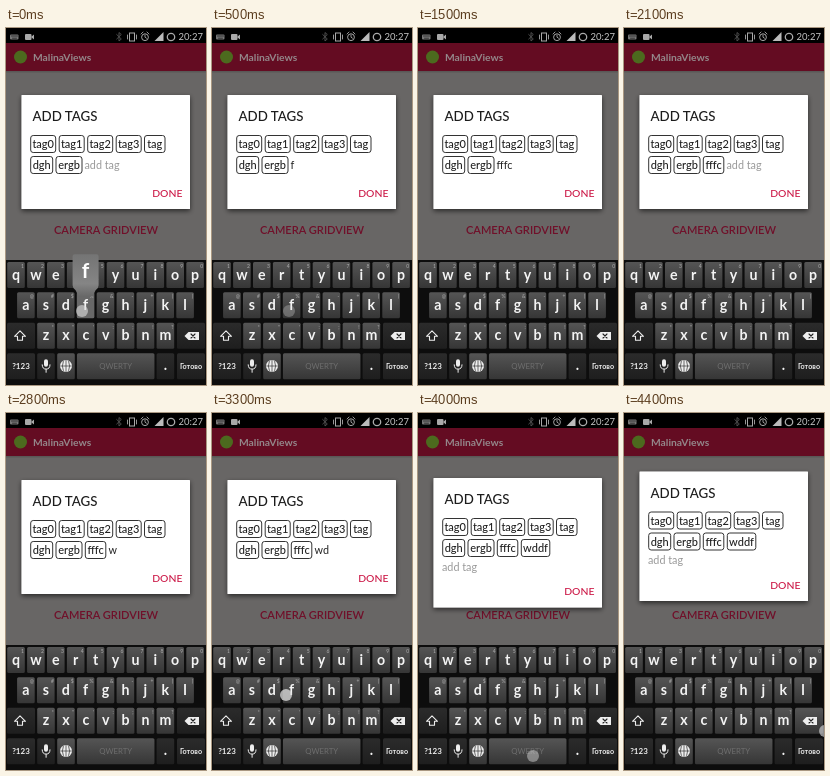
An HTML page for the animation above (4500 ms loop, 200 px wide and 357 px high).

```html
<!DOCTYPE html>
<html lang="en">
<head>
<meta charset="utf-8">
<title>Tag input</title>
<style>
html, body { margin: 0; width: 100%; height: 100%; overflow: hidden; background: #000; }
svg { display: block; width: 100%; height: 100%; font-family: Lato, "Open Sans", sans-serif; }
</style>
</head>
<body>
<svg id="stage" viewBox="0 0 200 357" preserveAspectRatio="none">
  <defs>
    <linearGradient id="key" x2="0" y2="1"><stop stop-color="#555"/><stop offset="1" stop-color="#363636"/></linearGradient>
    <linearGradient id="fn" x2="0" y2="1"><stop stop-color="#2b2b2b"/><stop offset="1" stop-color="#1e1e1e"/></linearGradient>
    <linearGradient id="pop" x2="0" y2="1"><stop stop-color="#747474"/><stop offset=".7" stop-color="#858585"/><stop offset="1" stop-color="#686868"/></linearGradient>
    <filter id="shade" x="-10%" y="-10%" width="120%" height="125%"><feDropShadow dx="0" dy="2" stdDeviation="2.6" flood-color="#000" flood-opacity=".6"/></filter>
  </defs>
</svg>
<script>
const NS = 'http://www.w3.org/2000/svg';
const stage = document.getElementById('stage');

function add(parent, name, attrs = {}, text) {
  const el = document.createElementNS(NS, name);
  for (const k in attrs) el.setAttribute(k, attrs[k]);
  if (text !== undefined) el.textContent = text;
  parent.appendChild(el);
  return el;
}
const rect = (p, x, y, width, height, fill, rx = 0) => add(p, 'rect', { x, y, width, height, fill, rx });
const label = (p, s, x, y, size, fill, extra = {}) =>
  add(p, 'text', { x, y, 'font-size': size, fill, ...extra }, s);
const line = (p, d, stroke, w = 1) =>
  add(p, 'path', { d, stroke, fill: 'none', 'stroke-width': w, 'stroke-linecap': 'round', 'stroke-linejoin': 'round' });
const show = (el, on) => el.setAttribute('visibility', on ? 'visible' : 'hidden');
const mid = { 'text-anchor': 'middle' };
const medium = { 'font-weight': 500 };
const midBold = { ...mid, 'font-weight': 700 };

// Activity behind the dialog
rect(stage, 0, 0, 200, 357, '#686665');
rect(stage, 0, 15, 200, 28, '#640c22');
rect(stage, 0, 43, 200, 1.5, '#5a5857');
add(stage, 'circle', { cx: 14.5, cy: 29, r: 6.5, fill: '#4c6a1e' });
label(stage, 'MalinaViews', 27, 32.6, 10.3, '#94878a', { 'font-weight': 700 });
label(stage, 'CAMERA GRIDVIEW', 100, 206, 11.1, '#70102a', { ...mid, 'font-weight': 600 });

// Status bar
rect(stage, 0, 0, 200, 15, '#000');
const dim = '#a8a8a8';
rect(stage, 4, 6.5, 8.5, 5, '#777', 1);
line(stage, 'M5.5 8h6M6.5 10.2h4', '#222', .8);
rect(stage, 19, 6, 6.5, 6, dim, 1);
add(stage, 'path', { d: 'M25 9l3-2.5v5z', fill: dim });
line(stage, 'M110.7 6.5l4.6 4.5-2.3 2V4.5l2.3 2-4.6 4.5', '#555', .9);
add(stage, 'rect', { x: 123.5, y: 5, width: 5, height: 8, stroke: dim, fill: 'none' });
line(stage, 'M121.5 7v4M130.5 7v4', dim, .9);
add(stage, 'circle', { cx: 139, cy: 9.2, r: 3.4, stroke: dim, fill: 'none' });
line(stage, 'M139 7.2v2l1.5 1M135 6l2-2M143 6l-2-2', dim, .9);
add(stage, 'path', { d: 'M148.5 13h9V4z', fill: '#bbb' });
add(stage, 'circle', { cx: 165, cy: 9, r: 3.7, stroke: '#aaa', fill: 'none', 'stroke-width': 1.3 });
label(stage, '20:27', 172.6, 12.3, 9.5, '#c4c4c4');

// Dialog
const dialog = add(stage, 'g');
const panel = rect(dialog, 15.5, 67, 168.5, 114, '#fff', .5);
panel.setAttribute('filter', 'url(#shade)');
label(dialog, 'ADD TAGS', 26.5, 93.2, 13.3, '#1c1c1c', medium);

function tag(s, x, y, w) {
  const g = add(dialog, 'g');
  add(g, 'rect', { x: x + .5, y: y + .5, width: w - 1, height: 17, rx: 2.5, fill: '#fff', stroke: '#333' });
  label(g, s, x + w / 2, y + 13, 11, '#222', { ...mid, ...medium });
  return g;
}
['tag0', 'tag1', 'tag2', 'tag3'].forEach((s, i) => tag(s, 24.2 + i * 28.5, 107, 26));
tag('tag', 138, 107, 21.5);
tag('dgh', 24.2, 128, 23);
tag('ergb', 49.5, 128, 27);
const tagA = tag('fffc', 78.8, 128, 21.5);
const tagB = tag('wddf', 102.8, 128, 29.5);
const input = label(dialog, '', 79, 141, 10.8, '#222');
const done = label(dialog, 'DONE', 146.2, 168.6, 10.4, '#cc1a48', medium);

// Keyboard
const board = add(stage, 'g');
rect(board, 0, 232, 200, 125, '#0d0d0d');
const keys = {};
const drawKey = (x, y, w, fill) => rect(board, x - w / 2, y - 13, w, 26, `url(#${fill})`, 1.5);

function row(letters, hints, x0, y) {
  [...letters].forEach((c, i) => {
    const x = x0 + i * 19.9;
    const el = drawKey(x, y, 17.6, 'key');
    label(board, hints[i], x + 8, y - 7, 5, '#b0b0b0', { 'text-anchor': 'end' });
    label(board, c, x, y + 4.5, 14.2, '#f4f4f4', midBold);
    keys[c] = { x, y, el };
  });
}
row('qwertyuiop', '1234567890', 10, 247);
row('asdfghjkl', '@#$%&-+()', 19.9, 277.3);
row('zxcvbnm', '*"\':;!?', 40, 307.8);

drawKey(15, 307.8, 28, 'fn');
line(board, 'M14 302.8l5.5 5.5h-3v4h-5v-4h-3z', '#eee', 1.1);
const back = drawKey(185, 307.8, 28, 'fn');
add(board, 'path', { d: 'M178.5 308l4-4h10.5v8h-10.5z', fill: '#eee' });
line(board, 'M185 306l4 4M189 306l-4 4', '#222', 1.1);

drawKey(15, 338.3, 28, 'fn');
label(board, '?123', 15, 340.8, 8, '#eee', midBold);
drawKey(40, 338.3, 17.6, 'fn');
rect(board, 38, 331.3, 4, 7.5, '#eee', 2);
line(board, 'M36.2 336.8q0 4.3 3.9 4.3t3.9-4.3M40.1 341.3v3', '#eee');
drawKey(60, 338.3, 17.6, 'key');
add(board, 'circle', { cx: 60, cy: 338, r: 6, fill: '#eee' });
line(board, 'M54.7 338h10.6M60 332.5v11M57.3 333.5q-2 4.5 0 9M62.7 333.5q2 4.5 0 9', '#444', .8);
drawKey(109.7, 338.3, 77.5, 'key');
label(board, 'QWERTY', 109.7, 340.8, 7.8, '#6e6e6e', mid);
drawKey(159.4, 338.3, 17.6, 'fn');
label(board, '.', 159.4, 342, 14.2, '#f4f4f4', midBold);
drawKey(185, 338.3, 28, 'fn');
label(board, 'Готово', 185, 340.8, 7.2, '#eee', midBold);

const popup = add(stage, 'g');
add(popup, 'path', {
  d: 'M-11-51h22q2 0 2 2v29q0 3-3 5l-3 6h-14l-3-6q-3-2-3-5v-29q0-2 2-2z',
  fill: 'url(#pop)'
});
const popLetter = label(popup, '', 0, -27, 21, '#fff', midBold);
const dot = add(stage, 'circle', { r: 6, fill: '#e0e0e0' });

// [start, typed text]; empty text shows the hint
const typing = [[0, ''], [100, 'f'], [700, 'ff'], [1000, 'fff'], [1300, 'fffc'], [1700, ''],
  [2700, 'w'], [3200, 'wd'], [3500, 'wdd'], [3800, 'wddf'], [3900, '']];
// [start, end, key]
const presses = [[0, 200, 'f'], [600, 800, 'f'], [1000, 1200, 'f'], [1200, 1400, 'c'],
  [2500, 2800, 'w'], [3100, 3300, 'd'], [3400, 3600, 'd'], [3700, 3900, 'f']];
// [time, x, y, opacity]
const touch = [[0, 76, 283, .6], [200, 76, 283, 0], [400, 77, 283, .15], [600, 77, 283, .45],
  [800, 77, 284, .15], [1000, 78, 288, .4], [1100, 80, 298, .4], [1200, 82, 310, .5],
  [1400, 82, 312, 0], [1500, 112, 343, 0], [1600, 112, 343, .45], [1800, 112, 343, 0],
  [2400, 31, 249, 0], [2500, 31, 249, .5], [2800, 31, 249, 0], [3000, 62, 282, 0],
  [3100, 62, 282, .5], [3300, 74, 282, .75], [3400, 66, 282, .5], [3600, 74, 283, .2],
  [3700, 77, 283, .5], [3800, 90, 305, .3], [3900, 114, 341, .5], [4000, 115, 343, .45],
  [4200, 115, 343, 0], [4300, 204, 318, 0], [4400, 201, 318, .6], [4500, 200, 318, .6]];
const lift = [[0, 0], [3900, 0], [4000, -2], [4100, -5], [4200, -7.5], [4300, -8.5], [4500, -8.5]];

function sample(table, t) {
  const i = table.findIndex(r => r[0] > t);
  const a = table[i - 1], b = table[i], p = (t - a[0]) / (b[0] - a[0]);
  return a.slice(1).map((v, j) => v + (b[j + 1] - v) * p);
}

function draw(now) {
  const t = Math.floor((now % 4500) / 100) * 100;

  const typed = typing.filter(r => r[0] <= t).pop()[1];
  const first = t >= 1700, second = t >= 3900;
  show(tagA, first);
  show(tagB, second);
  input.textContent = typed || 'add tag';
  input.setAttribute('fill', typed ? '#222' : '#999');
  input.setAttribute('x', second ? 24 : first ? 102.5 : 78.5);
  input.setAttribute('y', second ? 159.5 : 141);
  panel.setAttribute('height', second ? 129.5 : 114);
  done.setAttribute('y', second ? 184 : 168.6);
  dialog.setAttribute('transform', `translate(0 ${sample(lift, t)[0]})`);

  const press = presses.find(r => t >= r[0] && t < r[1]);
  for (const c in keys) keys[c].el.setAttribute('fill', press && press[2] === c ? '#686868' : 'url(#key)');
  show(popup, press);
  if (press) {
    const k = keys[press[2]];
    popup.setAttribute('transform', `translate(${k.x} ${k.y})`);
    popLetter.textContent = press[2];
  }
  back.setAttribute('fill', t >= 4400 ? 'url(#key)' : 'url(#fn)');

  const [x, y, o] = sample(touch, t);
  dot.setAttribute('cx', x);
  dot.setAttribute('cy', y);
  dot.setAttribute('opacity', o);
}

const start = performance.now();
function tick() {
  draw(performance.now() - start);
  requestAnimationFrame(tick);
}
tick();
</script>
</body>
</html>
```
